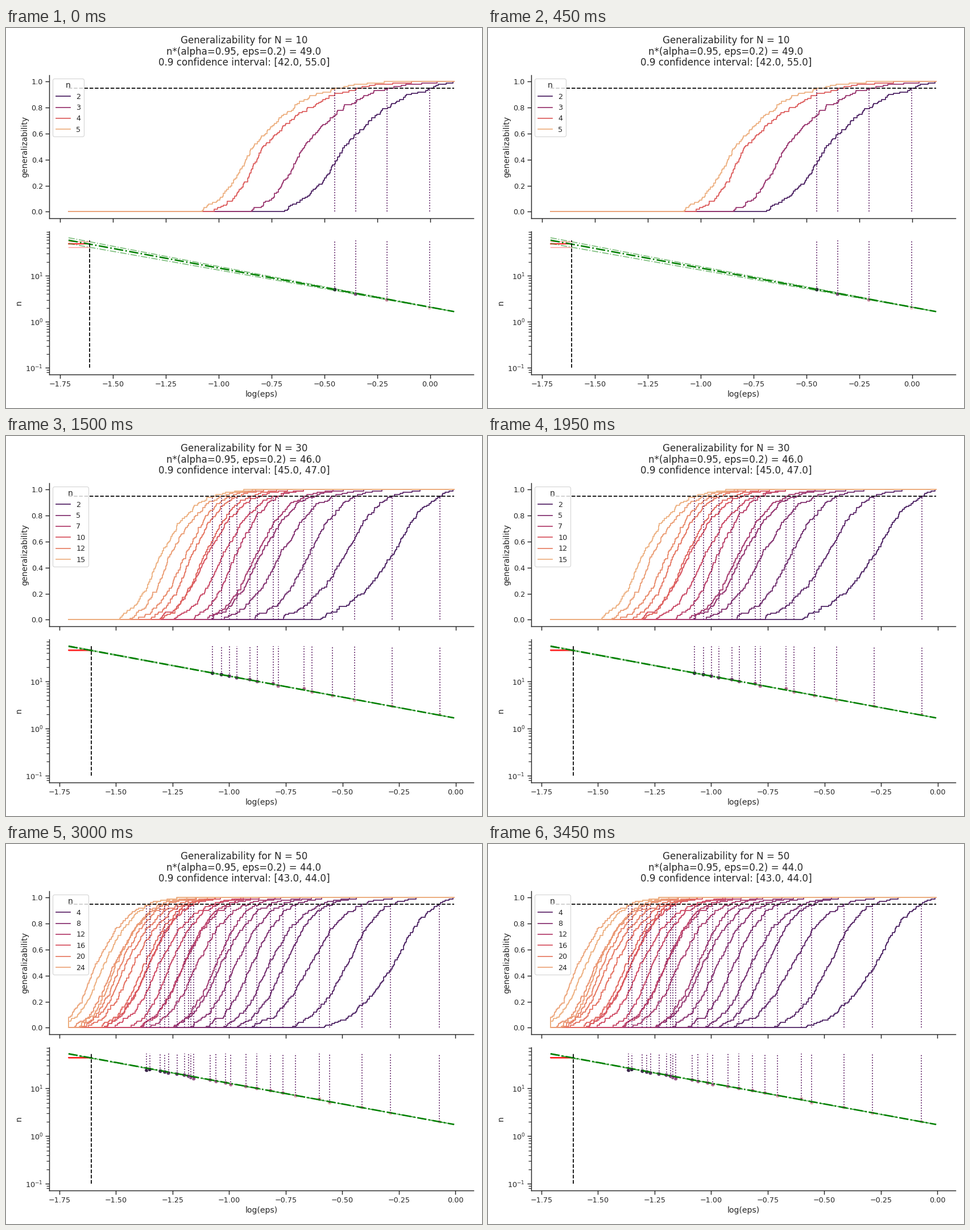
A matplotlib script that plays this animation: 837x669 px, repeating every 3.75 s.

```python
import numpy as np
import matplotlib.pyplot as plt
from matplotlib.animation import FuncAnimation
from matplotlib.colors import LinearSegmentedColormap
from matplotlib.lines import Line2D
from matplotlib.ticker import LogLocator, MultipleLocator, NullFormatter

W, H, DPI = 837, 669, 83.7
INK = "#262626"
DROP = "#58175f"
LOG_EPS = np.log(0.2)
X_MIN = LOG_EPS - 0.1
LEVELS = np.arange(101) / 100

plt.rcParams.update({
    "font.family": "DejaVu Sans", "font.size": 12, "text.color": INK,
    "axes.labelcolor": INK, "axes.edgecolor": INK, "axes.linewidth": 1.25,
    "axes.labelsize": 12, "axes.spines.top": False, "axes.spines.right": False,
    "xtick.color": INK, "ytick.color": INK,
    "xtick.labelsize": 11, "ytick.labelsize": 11,
    "xtick.major.size": 6, "ytick.major.size": 6, "ytick.minor.size": 4,
    "xtick.major.width": 1.25, "ytick.major.width": 1.25, "ytick.minor.width": 1,
    "legend.fontsize": 11, "legend.title_fontsize": 12,
    "lines.linewidth": 1.5,
})

FLARE = LinearSegmentedColormap.from_list("flare_rev", [
    "#4b2162", "#6c2b6d", "#8f3371", "#b13c6c",
    "#d14a61", "#e3685c", "#e98d6b", "#edb081"])

# end: log10 of the fitted n at x_max; key: first legend entry and its step
STUDIES = [
    dict(N=10, best=49, ci=(42, 55), x_max=0.114, end=0.221, key=(2, 1)),
    dict(N=20, best=46, ci=(44, 47), x_max=-0.002, end=0.234, key=(3, 1.5)),
    dict(N=30, best=46, ci=(45, 47), x_max=-0.0068, end=0.228, key=(2.5, 2.5)),
    dict(N=40, best=42, ci=(41, 42), x_max=0.018, end=0.23, key=(3, 3)),
    dict(N=50, best=44, ci=(43, 44), x_max=-0.0055, end=0.244, key=(4, 4)),
]


def cubehelix(t):
    """Light pink (t=0) to near black (t=1)."""
    x = 0.85 - 0.7 * t
    amp = 0.8 * x * (1 - x) / 2
    phi = 2 * np.pi * 0.4 * x
    mix = [(-0.14861, 1.78277), (-0.29227, -0.90649), (1.97294, 0.0)]
    return [x + amp * (a * np.cos(phi) + b * np.sin(phi)) for a, b in mix]


def slope_of(study, n_star):
    """Slope of log10(n) for a fit giving n_star, a rounded-up value, at LOG_EPS."""
    return (study["end"] - np.log10(n_star - 0.5)) / (study["x_max"] - LOG_EPS)


def fit(study, n_star, x):
    return 10 ** (study["end"] + slope_of(study, n_star) * (x - study["x_max"]))


def rising_curve(n, study, cross, rng):
    """Positions of the hundred small steps of a curve that reaches 0.95 at cross."""
    rest = (0.2 + 0.2 * (10 / study["N"]) ** 3) * rng.uniform(0.88, 1.12)
    rise = (0.17 + 0.3 / n) * rng.uniform(0.9, 1.1)
    half = cross - rest
    tail = max(0.01, min(0.6 * rest, study["x_max"] - 0.005 - cross))
    levels = [.01, .1, .25, .5, .75, .9, .95, .98, 1]
    xs = [half - rise, half - .62 * rise, half - .32 * rise, half,
          half + .38 * rest, half + .74 * rest, cross, cross + .4 * tail, cross + tail]
    u = LEVELS[1:]
    rough = np.sort(u + rng.normal(0, 0.012, u.size) * np.minimum(1, 8 * (1 - u)))
    return np.clip(np.interp(rough, levels, xs), X_MIN, study["x_max"])


def place(left, top, right, bottom):
    return fig.add_axes([left / W, 1 - bottom / H, (right - left) / W, (bottom - top) / H])


def draw_top(ax, study, ns, crossings, rng):
    shade = lambda n: FLARE(float((n - 2) / (ns[-1] - 2)))
    steps = np.concatenate([LEVELS, [1]])
    for n, cross in zip(ns, crossings):
        xs = rising_curve(n, study, cross, rng)
        ax.step([X_MIN, *xs, study["x_max"]], steps, where="post", color=shade(n))
    ax.plot([X_MIN, study["x_max"]], [0.95, 0.95], "k--")
    ax.vlines(crossings, 0, 0.95, linestyles=":", color=DROP)

    first, step = study["key"]
    marks = np.arange(first, ns[-1] + 0.6, step)
    ax.legend([Line2D([], [], color=shade(m)) for m in marks],
              [str(int(m)) for m in marks], title="n", loc="upper left")
    ax.yaxis.set_major_locator(MultipleLocator(0.2))
    ax.tick_params(labelbottom=False)
    ax.set_ylabel("generalizability")


def draw_bottom(ax, study, ns, crossings):
    ax.set_yscale("log")
    ends = np.array([X_MIN, study["x_max"]])
    main = fit(study, study["best"], ends)
    ax.scatter(crossings, ns, s=36, linewidth=0.48, edgecolor="white", zorder=1,
               color=[cubehelix((n - 2) / (ns[-1] - 2)) for n in ns])

    ax.plot([X_MIN, LOG_EPS], [study["best"]] * 2, color="red")
    for n_star in study["ci"]:
        ax.plot([X_MIN, LOG_EPS], [n_star] * 2, color="red", alpha=0.4, lw=1.2)
        ax.plot(ends, fit(study, n_star, ends), "-.", color="green", alpha=0.5)
    ax.plot(ends, main, "-.", color="green", lw=2.2)

    ax.plot([LOG_EPS] * 2, [0.1, main[0]], "k--")
    ax.vlines(crossings, ns, main[0], linestyles=":", color=DROP)

    ax.yaxis.set_major_locator(LogLocator(10))
    ax.yaxis.set_minor_locator(LogLocator(10, subs=range(2, 10)))
    ax.yaxis.set_minor_formatter(NullFormatter())
    ax.set_xlabel("log(eps)")
    ax.set_ylabel("n")


def draw(i):
    study = STUDIES[i]
    rng = np.random.default_rng(study["N"])
    ns = np.arange(2, study["N"] // 2 + 1)
    on_line = study["x_max"] + (np.log10(ns) - study["end"]) / slope_of(study, study["best"])
    crossings = on_line + rng.normal(-0.006, 0.015, ns.size)

    fig.clear()
    low, high = map(float, study["ci"])
    fig.suptitle(f"Generalizability for N = {study['N']}\n"
                 f"n*(alpha=0.95, eps=0.2) = {float(study['best'])}\n"
                 f"0.9 confidence interval: [{low}, {high}]",
                 fontsize=14.4, linespacing=1.1)
    upper = place(76, 82.8, 822, 334.8)
    lower = place(76, 357.8, 822, 609.8)
    draw_top(upper, study, ns, crossings, rng)
    draw_bottom(lower, study, ns, crossings)
    span = study["x_max"] - X_MIN
    for ax in (upper, lower):
        ax.set_xlim(X_MIN - 0.05 * span, study["x_max"] + 0.05 * span)
        ax.xaxis.set_major_locator(MultipleLocator(0.25))
    return []


fig = plt.figure(figsize=(W / DPI, H / DPI), dpi=DPI, facecolor="white")
anim = FuncAnimation(fig, draw, frames=len(STUDIES), interval=750, repeat=True)
plt.show()
```
